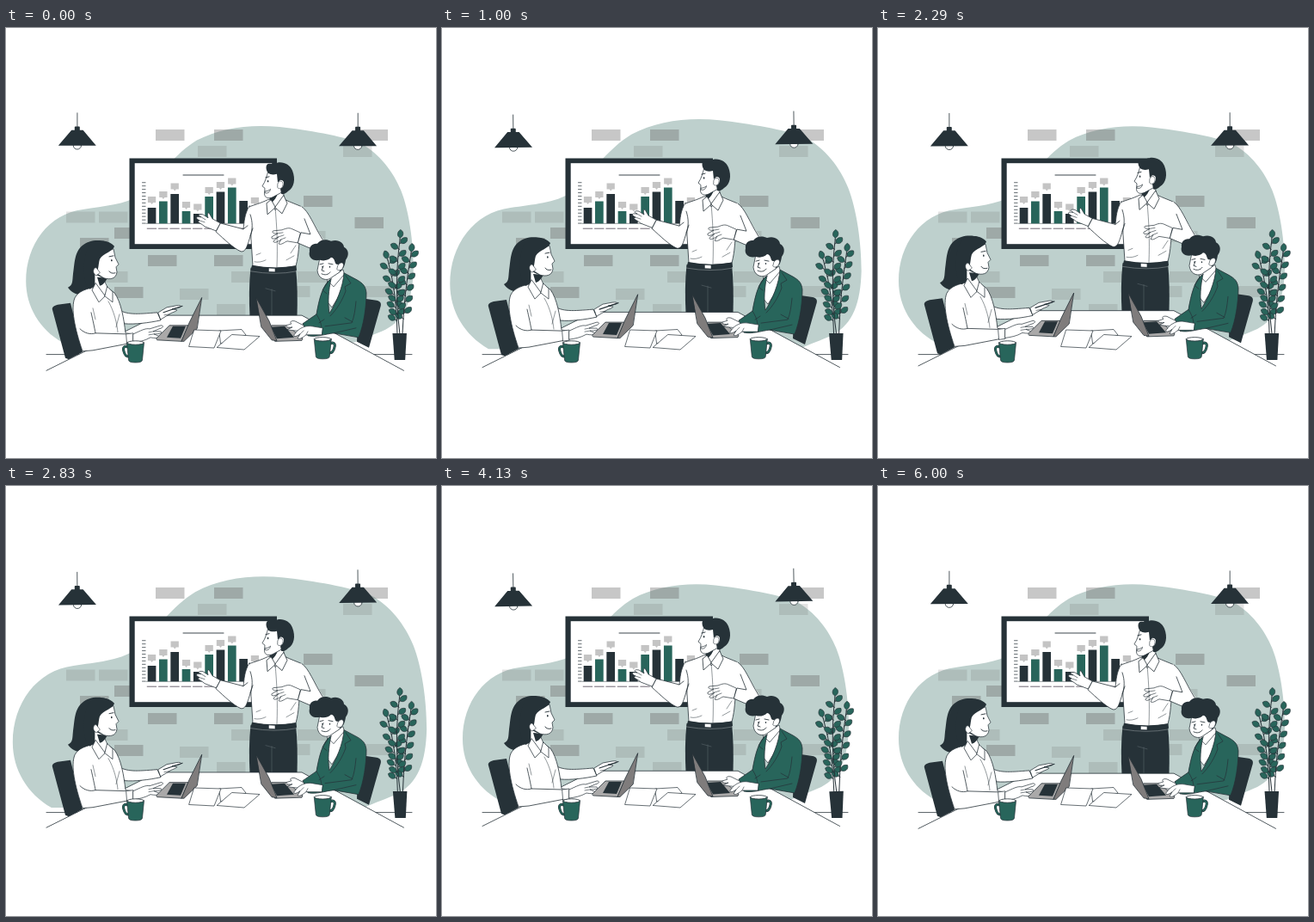
These frames come from a looping animation (500x500 px, 6040 ms). An HTML page with a canvas:

```html
<!DOCTYPE html>
<html lang="en">
<head>
<meta charset="utf-8">
<title>Team meeting</title>
<style>
  html, body { margin: 0; width: 100%; height: 100%; overflow: hidden; background: #fff; }
  canvas { display: block; width: 100vw; height: 100vh; }
</style>
</head>
<body>
<canvas id="stage"></canvas>
<script>
const LOOP = 6040;
const INK = '#263238', GREEN = '#28655b', MINT = '#bed0cd', WHITE = '#fff', GREY = '#c4c4c4';
const canvas = document.getElementById('stage');
const ctx = canvas.getContext('2d');

function shape(d, fill, stroke = INK, width = 0.8) {
  const path = new Path2D(d);
  if (fill) { ctx.fillStyle = fill; ctx.fill(path); }
  if (stroke) { ctx.strokeStyle = stroke; ctx.lineWidth = width; ctx.stroke(path); }
}
const line = (d, color = INK, width = 0.8) => shape(d, null, color, width);
const solid = (d, fill = INK) => shape(d, fill, null);

function rect(x, y, w, h, fill) {
  ctx.fillStyle = fill;
  ctx.fillRect(x, y, w, h);
}

function oval(x, y, rx, ry, fill, stroke) {
  ctx.beginPath();
  ctx.ellipse(x, y, rx, ry, 0, 0, Math.PI * 2);
  if (fill) { ctx.fillStyle = fill; ctx.fill(); }
  if (stroke) { ctx.strokeStyle = stroke; ctx.lineWidth = 0.8; ctx.stroke(); }
}

function group(draw, dx, dy) {
  ctx.save();
  ctx.translate(dx, dy);
  draw();
  ctx.restore();
}

function around(x, y, angle, scale, draw) {
  ctx.save();
  ctx.translate(x, y);
  ctx.rotate(angle);
  ctx.scale(scale, scale);
  ctx.translate(-x, -y);
  draw();
  ctx.restore();
}

// Linear interpolation through [position, value] stops
function track(u, stops) {
  for (let i = 1; i < stops.length; i++) {
    const [a, va] = stops[i - 1], [b, vb] = stops[i];
    if (u <= b) return va + (vb - va) * (u - a) / (b - a);
  }
  return stops[stops.length - 1][1];
}

function blob() {
  solid('M66 365C40 350 24 324 24 294C24 252 50 216 90 211C115 207 138 206 157 194' +
    'C180 172 197 146 222 131C250 116 285 112 318 115.5C350 119 390 126 411 134' +
    'C434 146 450 168 458.5 189C468 213 473 250 473 280C472 315 464 338 441 350' +
    'C428 356 418 359 405 365Z', MINT);
}

const darkBricks = [[174, 118], [242, 118], [410.5, 118], [346, 195], [405.5, 220],
  [86, 244], [126, 232], [165, 264], [242, 264], [126, 301]];
const lightBricks = [[223, 137], [392, 137], [70, 213.5], [108, 213.5], [108, 283],
  [262, 283], [339, 283], [202, 303], [245, 321], [338, 236], [320, 300], [416, 300]];

function bricks() {
  for (const [x, y] of darkBricks) rect(x, y, 33.5, 13, 'rgba(100,100,100,.36)');
  for (const [x, y] of lightBricks) rect(x, y, 33.5, 13, 'rgba(100,100,100,.18)');
}

function lamp() {
  line('M82.9 99V115', INK, 0.8);
  oval(82.9, 137, 4.6, 4.2, WHITE, INK);
  solid('M79.8 119V115.5Q79.8 114.7 80.6 114.7H85Q85.8 114.7 85.8 115.5V119H89.6L104.8 137H60.8L76.2 119Z');
}

// Bar top and bubble top, left to right
const bars = [[209, 196], [201.5, 190], [193, 180.5], [213, 202], [216, 204.5],
  [196, 185], [190.5, 179], [185.5, 174.5], [201, null], [212, 197]];

function board() {
  rect(143.5, 151.5, 171.5, 105.5, INK);
  rect(149.7, 157.2, 159.5, 94, WHITE);
  line('M206 171H253', INK, 0.9);
  for (let i = 0; i < 13; i++) line(`M158.5 ${179.7 + i * 3.95}h3.6`, INK, 0.7);
  line('M163 227.3H285', INK, 0.5);
  bars.forEach(([top, tip], i) => {
    const x = 164.7 + i * 13.32;
    rect(x, top, 9.7, 227.3 - top, i % 2 ? GREEN : INK);
    line(`M${x - 0.5} 233.2h10.5`, '#4b4050', 0.8);
    if (tip) solid(`M${x + 0.2} ${tip}h9.3v7h-3l-1.6 2l-1.6 -2h-3.1Z`, GREY);
  });
}

function speaker() {
  solid('M284.5 279C282.5 298 282.5 316 283.5 336H338.5C339 316 339 297 337 279Z');
  line('M302 303L313 306M309 304V334', '#59656a', 0.6);

  // torso
  shape('M304 200C296 204 288 206 283 208C281 214 285 234 285 246L287 277Q312 282 337 277' +
    'C341 262 340 252 342 244L349 224L344 208C337 205 331 203 325 200Z', WHITE);
  solid('M286 276Q312 281 337.5 276.5L338 282Q313 287 284.5 282Z');
  line('M284.5 283Q313 288 338 283', '#8b9497', 0.6);
  shape('M305.5 279.2L313 279.6V284L305.5 283.6Z', WHITE, INK, 0.7);

  // pointing arm
  shape('M283 207C277 217 277 226 276 234L249 227L244 237C254 246 264 256 273 260' +
    'C278 261 280 255 282 249L287 233', WHITE);
  line('M276 234L281 230M284 217C287 226 287 234 284 242');
  shape('M249 227L240 222L236 215C234 215 234 218 235 221L229 217C224 216 222 218 227 220' +
    'C221 219 219 221 225 224L223 225C224 227 228 228 231 231L244 236Z', WHITE, INK, 0.75);
  line('M227 220L232 223M225 224L231 226', INK, 0.6);

  // arm on chest
  solid('M343 207C352 213 358 230 369 246C372 251 363 256 353 256L339 250L342 236L340 215Z', WHITE);
  line('M344 208C352 213 358 230 368 246C371 251 363 256 353 256L339 250L343 238L354 240L347 222');
  shape('M342 238L333 234C329 232 326 233 321 235L311 236C308 237 311 240 316 239' +
    'L309 243C308 246 312 246 317 243L311 248C311 251 316 249 320 246L317 251' +
    'C320 253 324 249 327 248L339 250Z', WHITE, INK, 0.7);
  line('M316 239L322 238M317 243L323 241M320 246L325 244', INK, 0.6);
  line('M331 262L337 253M302 270C298 272 293 273 289 272M291 264L296 262M326 270L335 265', INK, 0.5);

  // neck, collar
  shape('M307 194L308 203L313 212L324 202L322 188Z', WHITE, INK, 0.7);
  solid('M306 197L316 192C315 197 312 201 308 204Z');
  shape('M308 200L303 204L304 217L313 209Z', WHITE);
  shape('M323 195L327 204L321 216L313 209Z', WHITE);
  line('M313 209C315 231 316 253 315 278', INK, 0.5);

  // head
  shape('M305 166C303 173 302 178 298 184L301 186.5L300.5 193C301 198 305 199 310 197' +
    'L321 191L325 176L315 165Z', WHITE, INK, 0.75);
  solid('M305 169C301 164 302 157 307 158C310 158 311 159 312 158C320 154 330 158 333 166' +
    'C337 176 335 186 328 190C325 193 322 194 320 193L319 187C324 186 325 176 319 177' +
    'L316 180L315 170C311 171 308 171 305 169Z');
  shape('M316 181C318 176 323 178 322 183C321 187 318 188 316 186Z', WHITE, INK, 0.6);
  line('M302 174L306 173', INK, 0.9);
  shape('M301.5 190C304 190 306 189 307.5 187.5C307 191 304 193 301.5 192Z', WHITE, INK, 0.7);
  oval(304.6, 178.3, 0.8, 1.2, INK);
}

function table() {
  const edge = 'M47 398.5L176 334.3H344L462.5 398.5';
  solid(edge, WHITE);
  line(edge);
}

function chairs() {
  solid('M54 328C53 325 56 323 60 322L75 320L89 377L73 385.5L69 384Z');
  solid('M410 314L431 317C436 318 437 321 435 326L422 372L408 365Z');
}

function woman() {
  // hair behind
  solid('M125 254C118 246 99 244 89 253C79 261 80 275 78 286C77 295 78 299 72 302' +
    'C77 309 86 313 96 310C104 308 109 304 110 296L112 262Z');

  // far arm
  shape('M130 327C140 334 152 333 176 331L180 340C166 343 150 345 138 344Z', WHITE);
  shape('M177 331L187 325L198 323C203 322 205 324 202 325L193 327L199 328C198 330 192 331 190 333' +
    'L180 339Z', WHITE, INK, 0.75);
  line('M183 331L205 323.5', INK, 1.1);
  line('M190 333L184 334', INK, 0.6);

  // torso and near arm
  shape('M106 301C94 303 84 306 80 314C75 326 80 350 89 376L101 375L148 366L148 356' +
    'L139 355C137 338 134 319 126 308L118 302Z', WHITE);
  line('M99 331C101 340 103 349 104 355L139 356M86 350C91 355 98 357 104 355');
  line('M101 326L104 339M132 333L128 348M119 318C126 330 129 344 130 354', INK, 0.5);
  shape('M140 356L148 355V367L141 368Z', WHITE, INK, 0.7);
  shape('M148 356C157 352 162 349 167 350L180 346C184 346 183 349 178 350L171 353L180 353' +
    'C183 355 178 356 172 356L179 359C178 361 173 361 168 360C161 364 155 365 148 366Z', WHITE, INK, 0.7);
  line('M171 353L166 354M172 356L166 357', INK, 0.6);

  // neck, collar
  shape('M103 286L103 302L114 313L119 304L113 291Z', WHITE, INK, 0.7);
  solid('M106 290L118 291C115 296 113 299 109 300Z');
  shape('M104 297L100 305L108 319L115 312Z', WHITE, INK, 0.75);
  shape('M118 301L124 307L124 319L115 312Z', WHITE, INK, 0.75);

  // face and fringe
  shape('M108 260L125 257L127 267L131 275L128 278L129 284C128 292 121 293 114 291L104 285L103 272Z', WHITE, INK, 0.75);
  solid('M126 254C125 260 113 262 109 269C107 276 108 282 104 286C101 291 102 299 98 304' +
    'C88 301 88 260 99 251C110 245 121 248 126 254Z');
  shape('M105 279C101 278 100 286 105 288L109 285Z', WHITE, INK, 0.6);
  line('M120 266L125 265M127 285C124 286 121 285 120 283', INK, 0.9);
  oval(122.8, 270.3, 0.8, 1.2, INK);
}

function coworker() {
  // shirt and neck
  shape('M374 292L392 281L396 298L379 325L373 318Z', WHITE, INK, 0.7);
  line('M376 296L381 301L393 287', INK, 0.7);

  // jacket
  shape('M378 292C368 298 364 316 361 333L345 344L351 358C362 360 371 356 381 355L410 360' +
    'C416 345 419 325 419 308C418 300 415 297 408 293L393 285C392 301 384 320 376 332' +
    'C374 319 375 305 378 292Z', GREEN);
  line('M395 288L401 297L394 301L395 306C391 317 385 327 377 335M376 293L368 305L373 309' +
    'M407 318C406 328 405 336 402 343L371 347M361 333C364 338 367 343 367 351M381 355L407 349' +
    'M403 342L394 337M370 339L364 343', INK, 0.7);

  // hands
  shape('M346 346L336 341C332 340 329 342 332 344L326 346C325 348 329 349 333 348L327 351L335 352L349 353Z', WHITE, INK, 0.7);
  shape('M368 349L356 347C349 346 344 348 339 352L335 357C334 360 338 359 342 356L339 361' +
    'C342 363 346 359 349 357L367 357Z', WHITE, INK, 0.7);
  line('M342 356L346 352M349 357L351 353', INK, 0.6);

  // head
  shape('M365 267L362 282C363 291 370 294 376 292L388 284L394 270L386 261Z', WHITE, INK, 0.75);
  solid('M365 270C357 272 351 267 353 260C352 254 357 250 362 251C366 245 374 246 378 248' +
    'C386 245 393 250 393 255C399 258 399 265 395 270C394 277 392 281 388 283L386 275' +
    'C381 276 384 268 378 267C374 271 369 271 365 270Z');
  shape('M386 276C389 271 394 273 392 278C391 282 387 283 385 281Z', WHITE, INK, 0.6);
  line('M365 275L369 274M375 274L380 275M369 277L367 282L370 283M367 286C371 288 375 287 377 284', INK, 0.85);
  oval(368, 278, 0.7, 1, INK);
  oval(376.5, 278, 0.7, 1, INK);
}

function laptops() {
  shape('M175 361L190 346L212 346L204 364.5L176 363Z', '#aaa9a9');
  solid('M187 360L194 347L209 347L203 361Z');
  shape('M227.5 314L213 343L204 364.5L207 364.5L222 350Z', '#7f7c7c');

  shape('M309 346L327 346L345 361L344 363.5L313 364.5Z', '#aaa9a9');
  solid('M308 348L324 347L335 360L315 361.5Z');
  shape('M291 314L306 341L315 364L309 363L297 348Z', '#7f7c7c');
}

function papers() {
  shape('M248 352L274 350.5L279 357L250 367Z', WHITE, INK, 0.7);
  shape('M219 351L250 352L242 372L213 370.5Z', WHITE, INK, 0.7);
  shape('M263 356.5L295 358.5L277 374L245.5 371.5Z', WHITE, INK, 0.7);
}

function cup(x, y, side) {
  ctx.save();
  ctx.translate(x, y);
  ctx.scale(side, 1);
  line('M9 5C13 3 15 6 13.5 10C12.5 14 10 16 8 16', INK, 3);
  line('M9 5C13 3 15 6 13.5 10C12.5 14 10 16 8 16', GREEN, 2);
  shape('M-10 0L-8 20Q-8 23 0 23Q8 23 8 20L10 0Z', GREEN, INK, 0.7);
  oval(0, 0, 9.8, 2.2, WHITE, INK);
  ctx.restore();
}

function leaf(x, y, angle) {
  ctx.save();
  ctx.translate(x, y);
  ctx.rotate(angle);
  shape('M0 0L2 0C3 -4 8 -5 11.5 -1C10 4 4 4 2 0Z', GREEN, INK, 0.6);
  ctx.restore();
}

// Quadratic stems: start, bend, tip, number of leaf pairs
const stems = [
  [455, 356, 455, 312, 444, 270, 5],
  [461, 356, 463, 308, 471, 262, 6],
  [458, 356, 451, 298, 458, 246, 6]
];

function plant() {
  for (const [x0, y0, x1, y1, x2, y2, pairs] of stems) {
    line(`M${x0} ${y0}Q${x1} ${y1} ${x2} ${y2}`, INK, 1);
    for (let i = 0; i < pairs; i++) {
      const k = 0.25 + 0.7 * i / (pairs - 1), j = 1 - k;
      const x = j * j * x0 + 2 * j * k * x1 + k * k * x2;
      const y = j * j * y0 + 2 * j * k * y1 + k * k * y2;
      leaf(x, y, -0.6);
      leaf(x, y + 6, Math.PI + 0.6);
    }
    leaf(x2, y2, Math.atan2(y2 - y1, x2 - x1));
  }
  solid('M449.5 355H466L464.2 386H451.8Z');
}

function scene(t) {
  const u = ((t + 20) % LOOP) / LOOP;
  const v = (u * 4) % 1;
  const beat = track(u, [[0, 1], [0.1, 1.1], [0.3, 1], [0.4, 1], [0.5, 1.1], [0.6, 1], [1, 1]]);
  const sway = track(v, [[0, 0], [0.25, 1], [0.75, -1], [1, 0]]) * Math.PI / 180;
  const lift = track(v, [[0, 0], [0.5, -6], [1, 0]]);

  rect(0, 0, 500, 500, WHITE);
  around(248.5, 240, 0, beat, blob);
  bricks();
  line('M47 379.6H100M420 379.6H472');
  board();
  around(246, 120, sway, 1, () => {
    lamp();
    group(lamp, 326.3, 0);
  });
  group(() => {
    speaker();
    chairs();
    table();
    woman();
    laptops();
    coworker();
  }, 0, lift);
  papers();
  cup(150.5, 366, -1);
  cup(368.3, 361.8, 1);
  around(459, 310, sway, 1, plant);
}

function resize() {
  const dpr = window.devicePixelRatio || 1;
  canvas.width = innerWidth * dpr;
  canvas.height = innerHeight * dpr;
}

const start = performance.now();
function tick() {
  ctx.setTransform(canvas.width / 500, 0, 0, canvas.height / 500, 0, 0);
  ctx.lineJoin = ctx.lineCap = 'round';
  scene(performance.now() - start);
  requestAnimationFrame(tick);
}

addEventListener('resize', resize);
resize();
tick();
</script>
</body>
</html>
```
